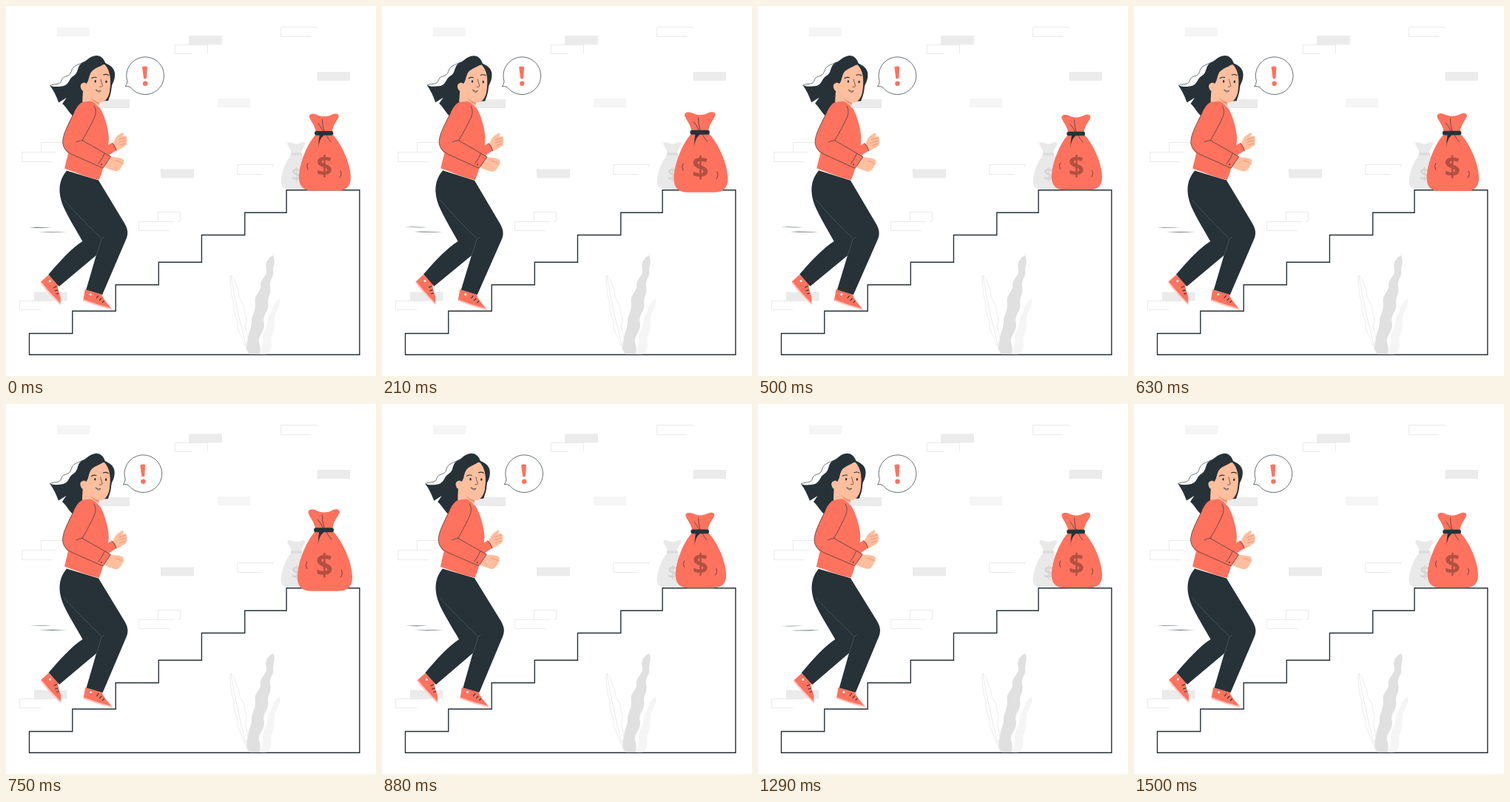
Write an HTML page that moves like this. It is 500 px wide and 500 px high and loops after 1.54 s.

```html
<!DOCTYPE html>
<html lang="en">
<head>
<meta charset="utf-8">
<style>
  html, body { margin: 0; width: 100%; height: 100%; overflow: hidden; background: #fff; }
  svg { display: block; width: 100%; height: 100%; }
  .dark { fill: #263238; }
  .coral { fill: #ff725e; }
  .skin { fill: #ffbe9d; }
  .line { fill: none; stroke: #263238; stroke-width: .65; stroke-linecap: round; stroke-linejoin: round; }
  .bold { stroke-width: 1.1; }
  .finger { stroke: #e0806d; }
  .sole { fill: none; stroke: #ffc7be; stroke-width: 2; }
  .sign { font: bold 37px "Open Sans", sans-serif; text-anchor: middle; }
</style>
</head>
<body>
<svg viewBox="0 0 500 500">
  <defs>
    <path id="sack" d="M419 171C418 162 412 157 410.3 151C410 146 417 146.500 421 148.500C427 151.500 434 151 439 148.500C444 146 449.500 146 449.300 150.500C447 157 441 162 440.500 171L441 174C452 185 465 212 465 231C465 243 459 248.300 447 248.300H414C402 248.300 396.800 242 396.800 231C397 212 408 186 419 174Z"/>
    <rect id="knot" x="417.300" y="169.700" width="24.700" height="5.600" rx="2.600"/>
    <text id="dollar" class="sign" x="430.300" y="229.500">$</text>
  </defs>

  <g id="bricks">
    <path fill="#f5f5f5" d="M69 29h44v12h-44zM286 125h44v12h-44z"/>
    <path fill="#ebebeb" d="M247 40.300h45v12h-45zM420.500 89h44.500v12h-44.500zM122 126h45v12h-45zM209 220.500h45v12h-45zM38 386.500h44.500v12h-44.500z"/>
    <path fill="none" stroke="#e8e8e8" stroke-width=".9" d="M412 41.500H371.500V28.500H420V31M251 64.500H228.500V52.500H272.500V64M47.500 197V184.500H92M63 210.500H21.500V197.500H68M346 227.500H312.500V214.500H360.500V217M205.500 291V278.500H235.500V291H232M221 303.500H179.500V291.500H228M47 410.500H18.500V398.500H62"/>
  </g>

  <path d="M31.500 471.200V442.500H89.800V412.200H148.200V376.700H206.300V346.300H264.400V309.500H322.700V279.200H379V248.800H477.800V471.200Z" fill="#fff" stroke="#263238" stroke-width="1.400"/>

  <g id="plants">
    <path fill="#f5f5f5" d="M370.500 395C361 401 361 408 358 413C352 421 355 431 350 438C345 446 349 457 343 470.500H352C362 464 357 452 360 444C365 433 361 424 364 416C369 408 371 402 370.500 395Z"/>
    <path fill="#e0e0e0" d="M361 337C351 342 350 350 352 357C353 365 344 368 344 377C345 386 336 389 336.500 399C338 410 334 415 332 423C333 434 327 441 327 450C323 459 325 466 329 470.500H342C347 462 340 457 342 449C346 440 351 436 348 425C349 414 356 411 354 401C354 391 359 389 357 379C355 370 363 366 361 358C361 350 365 345 361 337Z"/>
    <path fill="none" stroke="#e6e6e6" stroke-width=".8" d="M304 364C301 371 305 378 304 385C304 394 309 399 308 407C307 416 313 422 313 430C313 441 319 446 320 453L326 466C326 454 328 448 325 440C322 432 326 426 324 419C321 411 323 405 318 399C313 393 316 387 312 380C309 374 310 368 304 364L309 393L316 425L324 458"/>
  </g>

  <g transform="translate(122.500 91.700) scale(.628)" fill="#e9e9e9">
    <use href="#sack"/>
    <use href="#knot" fill="#dcdcdc"/>
    <use href="#dollar" fill="#d6d6d6"/>
  </g>

  <g id="bag">
    <use href="#sack" class="coral"/>
    <use href="#dollar" fill="#b35042"/>
    <path class="line" d="M422 159.500Q426 164 428.500 170M427.500 154Q427.500 162 430 170M408.500 212Q406 216 408.500 220.500M451.500 222Q454 227 450.500 231M433 175Q435 180 439 184"/>
    <path class="dark" d="M424 174Q422.500 182 422.300 192Q423 184 426 179L430 174.500Z"/>
    <use href="#knot" class="dark"/>
  </g>

  <g id="woman">
    <path class="dark" d="M31.500 299.300Q46 298.900 61.500 299.500Q46 300.200 31.500 299.300ZM44 305.500Q62 305 82.500 305.500Q62 306.300 44 305.500Z"/>

    <!-- hair behind the face -->
    <path class="dark" d="M134 77C131 68 124 65.500 118.500 67.500C112 69 109 74 104 76C98 79 98 83 96 88C94 94 90 94 87 98C84 103 82 108 75 108.500C70 109 65 110 59.300 107.500C64 114 68 122 71 130.500L81.500 124L76 132C82 137 85 145 92 150C100 147 104 139 104 130L138 128C141 120 143 113 142 108C147 101 149 90 144 84C141 80 137 79 134 77Z"/>
    <path class="line" d="M59.500 107.500C66 104 73 108 75 100C77 93 86 97 88 88.500C90 80 97 80 104 76"/>

    <!-- far hand -->
    <path class="skin" d="M141 188C147 184 146 179 151 175L157 171C160 171 159 174 157 176L162 175.500C164 178 164 184 162.500 188C158 191 155 193 149 196Z"/>
    <path class="line finger" d="M153 180L162 177.500M153 184L162 181.500M154 188L161 185.500"/>
    <path class="coral" d="M132 191L143 185C147 187 149 192 149 195L137 203Z"/>
    <path class="line" d="M143 185Q147 188 149 195"/>

    <!-- neck and head -->
    <path class="skin" d="M104 110L103 129C108 138 121 139 126 134L125.500 130C134 132 140 122 140.500 110C142 98 140 86 133 79L118 80L109 103C103 102 99 106 101 111C102 115 105 116 108 114Z"/>
    <path fill="#e98f77" d="M114 123Q119 129 126 130L125.500 132.500Q117 130 114 123Z"/>
    <path class="dark" d="M133 77C129 82 120 83 115 89C111 94 113 99 108.500 105C106 103 104 103 102.500 105C99 98 102 85 109 80C115 72 126 71 133 77ZM132 77C138 83 141 90 141 99C141.500 105 141 110 140 115C143 111 143 107 143 104C149 93 144 80 132 77Z"/>
    <ellipse class="dark" cx="120.500" cy="101.800" rx="1.200" ry="1.800"/>
    <ellipse class="dark" cx="135.200" cy="102.200" rx="1.200" ry="1.800"/>
    <path class="line bold" d="M115.500 97.500Q118.500 95.500 122 96.500M131.500 93Q135 91.500 138.500 93.500"/>
    <path class="line" d="M127.800 99L130.300 108Q128.500 110 126.500 109"/>
    <path d="M121 113Q125 116 128 114.500Q125 118.500 121 113Z" fill="#fff" stroke="#263238" stroke-width=".7"/>

    <!-- shoes -->
    <path class="coral" d="M47 373L57.500 363.500L70.500 377C69 382 73 388 74 394V403.500Z"/>
    <path class="sole" d="M47.500 374Q59 389 73.800 403"/>
    <path class="coral" d="M107 383L129.500 389.500C131 396 138 402 143.500 410L104.500 398Z"/>
    <path class="sole" d="M104.800 397.500Q124 405 143 409.500"/>
    <path class="line bold" d="M65 380.500L68.500 379M66.500 385L70 384M68.500 389L71 388.500M122.500 394.500L125 391.500M126.500 397.500L129 395M130.500 400.500L132.500 398.500"/>
    <circle cx="59.500" cy="372" r="1.600" fill="#fff"/>
    <circle cx="114.500" cy="389.500" r="1.600" fill="#fff"/>

    <!-- trousers -->
    <path class="dark" d="M82 222.500L125 235.500L160.500 294C165 302 165.500 308 162.500 315L130.500 390L108.500 383.500L122 337L72 379L57.500 363C72 346 88 328 103.500 318C94 301 85 287 78.500 273C71 256 69 238 82 222.500Z"/>
    <path d="M79 262Q88 274 129 314M133 312L129 315Q126 327 122 337" fill="none" stroke="#53656e" stroke-width=".6"/>

    <!-- jumper and near arm -->
    <path class="skin" d="M132 205L142 203.500C148 205 152 204 157.500 206.500C160 209 160 213 157 215C156 219 153 223 148 223.500C144 222 140 221 133 218Z"/>
    <path class="line finger" d="M148 209Q154 209 157 213"/>
    <path class="coral" d="M103 130C96 133 92 144 87 153C82 164 77 173 76.500 184C77 191 80 195 84 199L79 219.500C93 224.500 109 231 125.500 235C128 230 130 224 131 219L141.500 203.500L135.500 198C138 190 139.500 183 138.500 174C137 162 133 148 127 138C121 134 120 129 113 128.500Z"/>
    <path class="line" d="M92 144C82 164 77 173 76.500 184C77 192 82 197 89 200.500L131 219L141.500 203.500L103 181.500Q98 182 95 184M103 181.500Q114 163 119.500 150Q123 142 119 135M133 199.500Q130 207 125 213"/>
    <circle class="dark" cx="129" cy="214" r=".9"/>
  </g>

  <g id="bubble">
    <path d="M168.500 109.800A25.300 25.300 0 1 0 164.200 101.500Q164 106 161.500 108.700Q165 108 168.500 109.800Z" fill="#fff" stroke="#263238" stroke-width=".7"/>
    <path class="coral" d="M184.300 82.500Q187.700 80.800 191.200 82.300L190.300 97.500Q188.300 98.800 186.300 97.700Z"/>
    <circle class="coral" cx="188.400" cy="104.800" r="3.200"/>
  </g>
</svg>
<script>
  const LOOP = 1540;
  const START = 0.0247;
  const PULSE = [[0, 1], [.1, 1.1], [.3, 1], [.4, 1], [.5, 1.1], [.6, 1], [1, 1]];
  const SWAY = [[0, 0], [.25, 1], [.75, -1], [1, 0]];
  const SHAKE = [[0, 0], [.1, -1], [.2, 2], [.3, -4], [.4, 4], [.5, -4], [.6, 4], [.7, -4], [.8, 2], [.9, -1], [1, 0]];

  // Linear interpolation between [position, value] keys
  function valueAt(keys, p) {
    const i = keys.findIndex(([end]) => end > p);
    const [a, from] = keys[i - 1], [b, to] = keys[i];
    return from + (to - from) * (p - a) / (b - a);
  }

  const [bag, woman, bubble] = ["bag", "woman", "bubble"].map(id => document.getElementById(id));
  const began = performance.now();

  function draw() {
    const p = ((performance.now() - began) / LOOP + START) % 1;
    bag.setAttribute("transform", `translate(431 198) scale(${valueAt(PULSE, p)}) translate(-431 -198)`);
    woman.setAttribute("transform", `rotate(${valueAt(SWAY, p)} 98 238)`);
    bubble.setAttribute("transform", `translate(${valueAt(SHAKE, p)} 0)`);
    requestAnimationFrame(draw);
  }
  draw();
</script>
</body>
</html>
```
